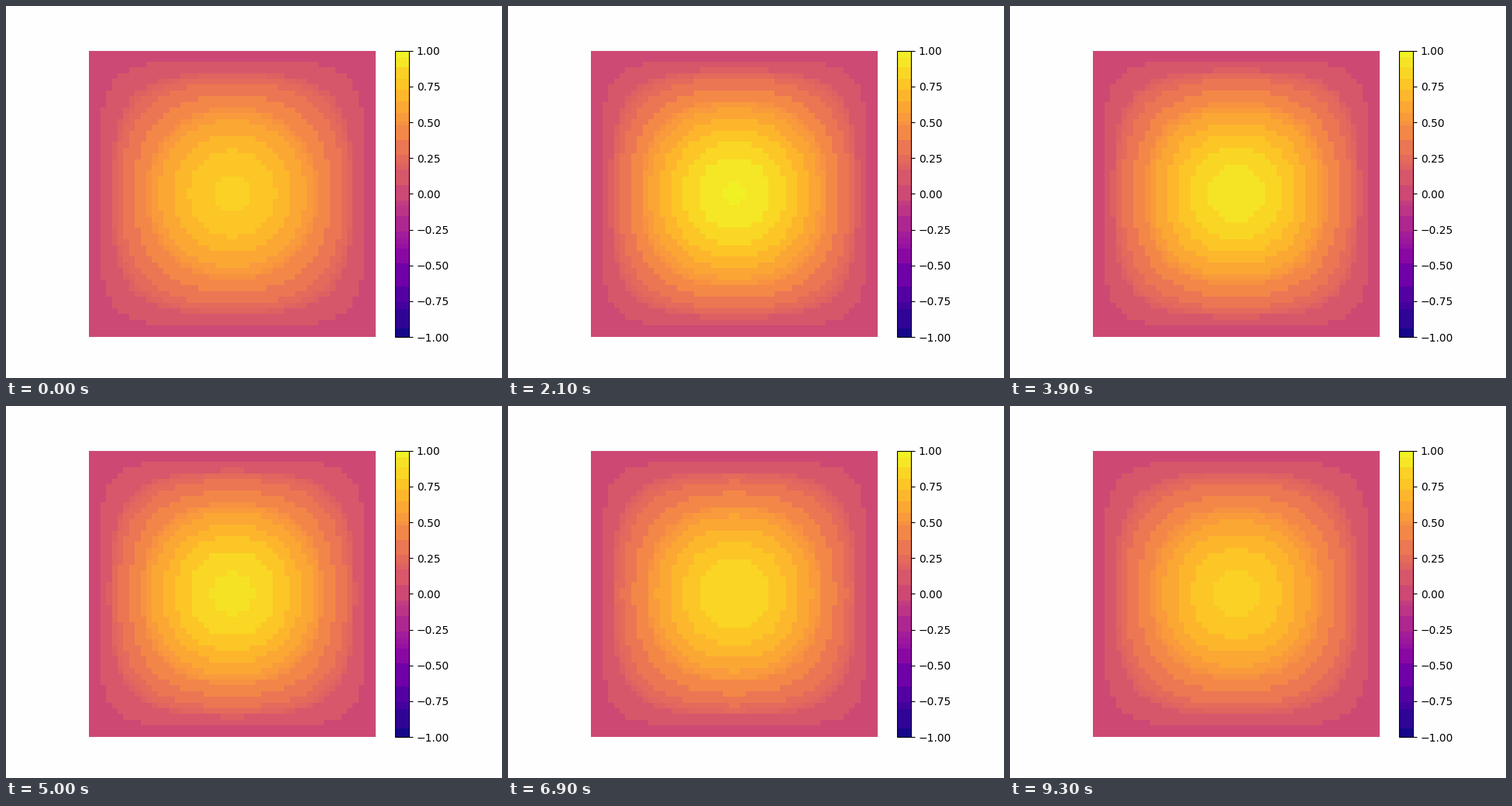
Recreate the animation shown at these times as a matplotlib script. Size 640x480 px, loop 9.7 s.

```python
import numpy as np
import matplotlib.pyplot as plt
from matplotlib.animation import FuncAnimation
from matplotlib.colors import ListedColormap

CELLS = 50
FRAMES = 97
INTERVAL = 100
PAPER = (254 / 255,) * 3

mode = np.sin(np.pi * np.arange(CELLS) / (CELLS - 1))
start = np.outer(mode, mode)
decay = np.cos(np.pi / (CELLS - 1))  # per explicit heat step at r = 1/4

# Plasma shades grouped into coarse RGB boxes
shades = plt.get_cmap("plasma")(np.arange(256), bytes=True)[:, :3].astype(int)
boxes = (shades[:, 0] >> 5) * 256 + (shades[:, 1] >> 4) * 8 + (shades[:, 2] >> 5)
_, group = np.unique(boxes, return_inverse=True)

SIDE = 0.77 * 480
CELL_AREA = (SIDE / CELLS) ** 2
BAR_AREA = SIDE / 20 * SIDE / 256


def heat(n):
    """The plate at frame n; the loop opens on the cooled state."""
    steps = FRAMES - 2 if n == 0 else max(n - 2, 0)
    return start * decay ** steps


def banded(field):
    """Flatten each box of shades to its mean, weighted by area on screen."""
    index = np.clip((field + 1) * 128, 0, 255).astype(int)
    weight = np.bincount(index.ravel(), minlength=256) * CELL_AREA + BAR_AREA
    total = np.bincount(group, weight)
    means = [np.bincount(group, weight * shades[:, c]) / total for c in range(3)]
    flat = np.floor(np.array(means).T + 1e-6)[group]
    return ListedColormap((flat + 0.3) / 255)


fig, ax = plt.subplots(figsize=(6.4, 4.8), dpi=100, facecolor=PAPER)
ax.axis("off")
plate = ax.imshow(heat(0), cmap=banded(heat(0)), vmin=-1, vmax=1,
                  interpolation="nearest")
bar = fig.colorbar(plate, ax=ax)


def update(n):
    field = heat(n)
    plate.set_data(field)
    plate.set_cmap(banded(field))
    return (plate,)


anim = FuncAnimation(fig, update, frames=FRAMES, interval=INTERVAL,
                     repeat=True, repeat_delay=0, blit=False)
plt.show()
```
